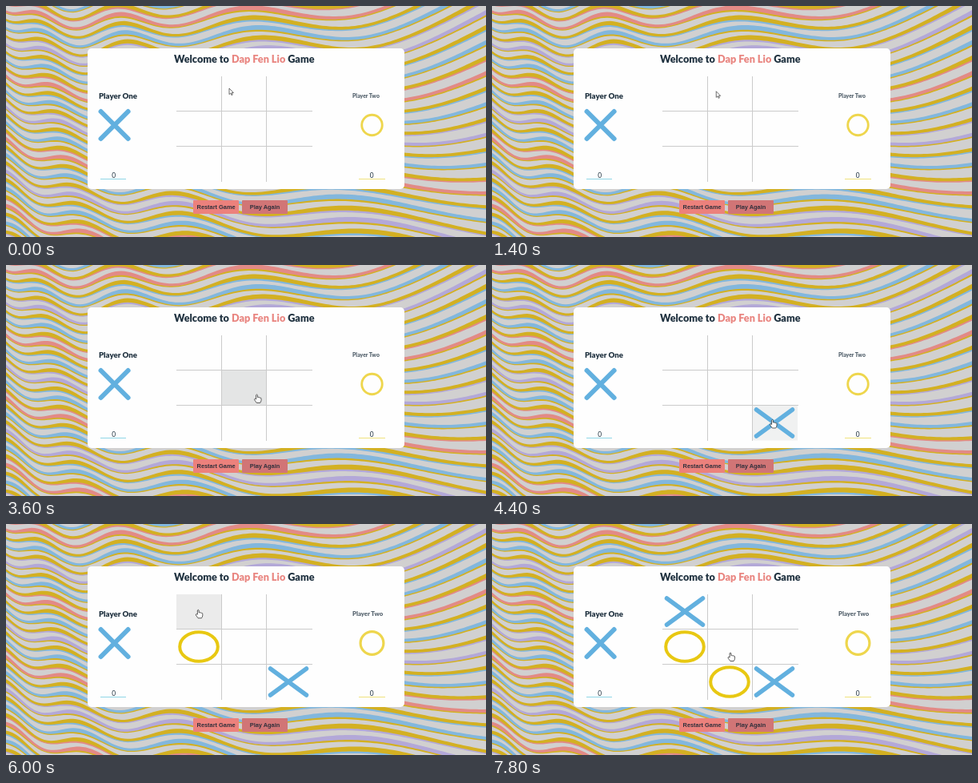
Write an HTML page with a canvas that moves like this. It is 600 px wide and 289 px high and loops after 8000 ms.

```html
<!DOCTYPE html>
<html lang="en">
<head>
<meta charset="utf-8">
<title>Board game</title>
<style>
  html, body { margin: 0; width: 100%; height: 100%; overflow: hidden; background: #d0cfcf; }
  canvas, svg { position: absolute; left: 0; top: 0; width: 600px; height: 289px; }
  text { fill: #203240; font-family: Lato, sans-serif; font-weight: 900; }
  .title { font-size: 12.7px; }
  .label { font-size: 9.7px; }
  .score { font: 400 8.5px Inter, sans-serif; text-anchor: middle; }
  .button { font: 700 7.4px "Liberation Sans", Arial, sans-serif; text-anchor: middle; fill: #30303c; }
  .cross { stroke: #62b0df; stroke-linecap: round; fill: none; }
  .ring { stroke: #e8c812; fill: none; }
</style>
</head>
<body>
<canvas id="waves" width="600" height="289"></canvas>
<svg viewBox="0 0 600 289">
  <rect x="102" y="53" width="396" height="176" rx="5" fill="#fefefe"/>
  <text class="title" x="210" y="70.8">Welcome to <tspan fill="#e98580">Dap Fen Lio</tspan> Game</text>

  <g id="hovers" fill="#e4e5e5"></g>
  <path d="M269.5 88V220M325.5 88V220M213 131.5H383M213 175.5H383" stroke="#cbcbcb" fill="none"/>
  <g id="marks"></g>

  <g id="labelOne"><text class="label" x="164" y="115.7" text-anchor="end">Player One</text></g>
  <g id="iconOne"><path class="cross" d="M118.6 132L152.6 166M152.6 132L118.6 166" stroke-width="6"/></g>
  <g id="labelTwo"><text class="label" x="433" y="115.7">Player Two</text></g>
  <g id="iconTwo"><circle class="ring" cx="457.5" cy="149" r="18" stroke-width="4"/></g>

  <text class="score" x="134.7" y="215">0</text>
  <text class="score" x="457.3" y="215">0</text>
  <path d="M118 216.5H150" stroke="#8fd6e6"/>
  <path d="M441 216.5H474" stroke="#f0e37c"/>

  <rect x="234" y="243" width="57" height="17" rx="1" fill="#ec817c"/>
  <rect x="295" y="243" width="57" height="17" rx="1" fill="#d17576"/>
  <text class="button" x="262.6" y="254">Restart Game</text>
  <text class="button" x="323.5" y="254">Play Again</text>

  <path id="arrow" d="M0 0V7.6L1.8 6L3 8.6L4.2 8L3.1 5.6H5.4Z" fill="#fff" stroke="#333" stroke-width=".7"/>
  <path id="hand" d="M-.9 6V.7Q0-.6 .9 .7V3.5Q1.8 2.9 2.5 3.8Q3.6 3.2 4.1 4.2Q5.4 3.8 5.5 5.2V7.5Q5.2 9 4.2 10.5H-.2Q-1.6 8.6-2.9 6.7Q-3.2 5.3-1.8 5.3Z" fill="#fff" stroke="#333" stroke-width=".8"/>
</svg>
<script>
const LOOP = 8000, STEP = 200;
const $ = id => document.getElementById(id);
const clamp = v => Math.max(0, Math.min(1, v));
const ease = v => v * v * (3 - 2 * v);

function paintWaves() {
  const ctx = $('waves').getContext('2d');
  const yellow = '#d3b022';
  const accents = ['#82b7dd', '#b3a8d8', '#82b7dd', '#e28a86'];
  ctx.fillStyle = '#d1d0d0';
  ctx.fillRect(0, 0, 600, 289);

  const phase = (y, x) => 2 * Math.PI * (x / (70 + x * .17) - 1.45 - y * .0023);
  const gap = x => 10.5 + x * .007;

  // Waves lengthen to the right; the left end droops and the upper right end rises.
  function center(k, x) {
    const y = 100 + k * gap(x);
    const left = Math.max(0, 110 - x) ** 2 / 500;
    const right = Math.max(0, x - 420) ** 2 / 650 * (1 - y / 270);
    return y - left - right - (5 + 4 * clamp(x / 150)) * Math.cos(phase(y, x));
  }

  // Fills the strip between two offsets, given as fractions of the gap.
  function ribbon(k, top, bottom, color) {
    const edge = (x, f) =>
      center(k, x) + f * gap(x) * (1 + .25 * Math.sin(phase(k * 11, x)));
    ctx.beginPath();
    for (let x = -4; x <= 604; x += 4) ctx.lineTo(x, edge(x, top));
    for (let x = 604; x >= -4; x -= 4) ctx.lineTo(x, edge(x, bottom));
    ctx.fillStyle = color;
    ctx.fill();
  }

  for (let k = -14; k < 24; k++) {
    const n = k + 14, accent = accents[(n >> 1) % 4];
    ribbon(k, -.22, .2, n % 2 ? accent : yellow);
    ribbon(k, .14, .28, n % 2 ? yellow : accent);
  }
}

// Column, row, kind and time of each move.
const moves = [
  [2, 2, 'x', 4400], [0, 1, 'o', 5200], [0, 0, 'x', 6200], [1, 2, 'o', 7200]
].map(([col, row, kind, at]) => ({ col, row, kind, at }));

// Column, row, start and end of each lit cell.
const hovers = [
  [1, 1, 2400, 3800], [2, 2, 3800, 4200], [0, 1, 4600, 4900],
  [0, 0, 5600, 5900], [1, 1, 6200, 6600], [1, 2, 6800, 7000]
];

// Time, x and y of the pointer's tip.
const pointer = [
  [0, 279, 103], [1200, 279, 103], [2200, 291, 139], [2800, 305, 155],
  [3600, 313.5, 162], [4200, 352, 194], [4600, 349, 193], [5200, 256, 149],
  [5400, 255.5, 149], [5900, 240, 107], [6200, 241, 108], [6800, 295, 192],
  [7300, 296, 192], [7800, 298, 161]
];

const svgNode = (parent, tag, attrs) => {
  const node = document.createElementNS('http://www.w3.org/2000/svg', tag);
  for (const key in attrs) node.setAttribute(key, attrs[key]);
  return parent.appendChild(node);
};

for (const move of moves) {
  const x = 241 + move.col * 56, y = 109.5 + move.row * 44;
  move.node = move.kind === 'x'
    ? svgNode($('marks'), 'path', {
        class: 'cross', 'stroke-width': 5.5,
        d: `M${x - 22.5} ${y - 16.5}l45 33m0-33l-45 33` })
    : svgNode($('marks'), 'ellipse', {
        class: 'ring', 'stroke-width': 4, cx: x, cy: y, rx: 23.8, ry: 18.3 });
}

const cells = hovers.map(([col, row, from, to]) => ({
  from, to,
  node: svgNode($('hovers'), 'rect', {
    x: 213 + col * 56.5, y: 88 + row * 44, width: 56, height: 43.5 })
}));

function pointerAt(t) {
  const i = pointer.findIndex(p => p[0] > t);
  if (i < 0) return pointer[pointer.length - 1].slice(1);
  const [t0, x0, y0] = pointer[i - 1], [t1, x1, y1] = pointer[i];
  const f = ease((t - t0) / (t1 - t0));
  return [x0 + (x1 - x0) * f, y0 + (y1 - y0) * f];
}

function scaleAt(id, x, y, scale, opacity) {
  $(id).setAttribute('transform', `translate(${x} ${y}) scale(${scale}) translate(${-x} ${-y})`);
  $(id).setAttribute('opacity', opacity);
}

function draw(time) {
  const t = Math.floor(time % LOOP / STEP) * STEP;
  const turns = moves.filter(m => t >= m.at + 300).length;
  const oneActive = turns % 2 === 0;
  const idle = [turns ? .8 : .71, .75];
  const one = oneActive ? [1, 1] : idle;
  const two = oneActive ? idle : [1, 1];
  scaleAt('labelOne', 164, 112, ...one);
  scaleAt('iconOne', 135.6, 149, ...one);
  scaleAt('labelTwo', 433, 112, ...two);
  scaleAt('iconTwo', 457.5, 149, ...two);

  for (const m of moves) m.node.style.display = t >= m.at ? '' : 'none';
  for (const c of cells) {
    const level = Math.min(clamp((t - c.from) / 400), clamp((c.to + 400 - t) / 400));
    c.node.setAttribute('opacity', level);
  }

  const [x, y] = pointerAt(t), isHand = t >= 2400;
  for (const [id, shown] of [['arrow', !isHand], ['hand', isHand]]) {
    $(id).style.display = shown ? '' : 'none';
    $(id).setAttribute('transform', `translate(${x} ${y})`);
  }
}

paintWaves();
draw(0);
const start = performance.now();
(function tick() {
  draw(performance.now() - start);
  requestAnimationFrame(tick);
})();
</script>
</body>
</html>
```
